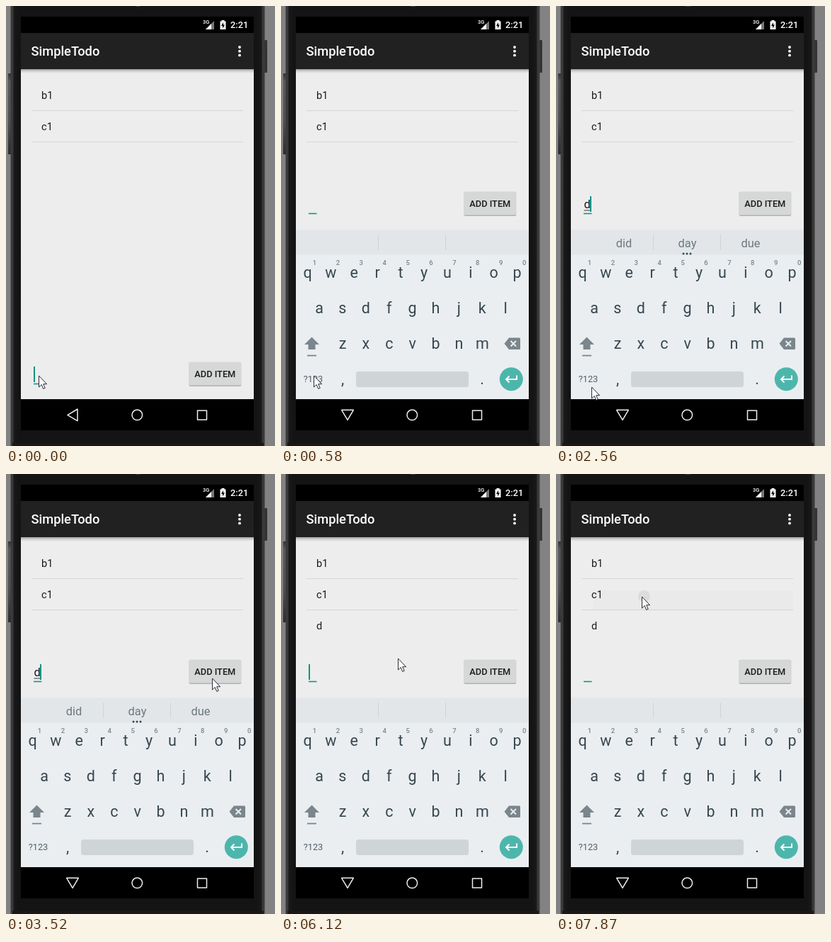
Recreate the animation shown at these times as an HTML page. Size 380 px wide and 620 px high, loop 8 s.

```html
<!DOCTYPE html>
<html lang="en">
<head>
<meta charset="utf-8">
<title>Todo list</title>
<style>
html, body { margin: 0; width: 100%; height: 100%; overflow: hidden; background: #828282; }
svg { display: block; width: 380px; height: 620px; font-family: Roboto, sans-serif; }
.medium { font-weight: 500; }
.middle { text-anchor: middle; }
</style>
</head>
<body>
<svg id="stage" viewBox="0 0 380 620">
  <defs>
    <linearGradient id="barShadow" x2="0" y2="1">
      <stop offset="0" stop-color="#000" stop-opacity=".32"/>
      <stop offset=".5" stop-color="#000" stop-opacity=".11"/>
      <stop offset="1" stop-color="#000" stop-opacity="0"/>
    </linearGradient>
    <linearGradient id="edge">
      <stop offset="0" stop-color="#3a3a3a"/>
      <stop offset=".008" stop-color="#3a3a3a"/>
      <stop offset=".014" stop-color="#191919"/>
      <stop offset=".03" stop-color="#141414"/>
      <stop offset=".97" stop-color="#141414"/>
      <stop offset=".986" stop-color="#191919"/>
      <stop offset=".992" stop-color="#3a3a3a"/>
      <stop offset="1" stop-color="#3a3a3a"/>
    </linearGradient>
    <linearGradient id="sideButton" x2="0" y2="1">
      <stop offset="0" stop-color="#333"/>
      <stop offset=".1" stop-color="#5a5a5a"/>
      <stop offset=".6" stop-color="#505050"/>
      <stop offset="1" stop-color="#2c2c2c"/>
    </linearGradient>
    <clipPath id="contentClip"><path d="M21 89h329v465H21z"/></clipPath>
  </defs>

  <!-- device -->
  <path d="M0 0h380v620H0z" fill="#828282"/>
  <rect x="3" y="95" width="6" height="114" rx="1" fill="url(#sideButton)"/>
  <rect x="364" y="48" width="5" height="46" rx="1" fill="#343434"/>
  <path d="M6.500 0h359v620h-359z" fill="url(#edge)"/>
  <path d="M182 0h9q-4.500 2-9 0z" fill="#444"/>
  <path d="M9 615.500h355v4.500H9z" fill="#1b1719"/>

  <!-- status and action bars -->
  <path d="M21 15h329v23H21z"/>
  <path d="M21 38h329v51H21z" fill="#212121"/>
  <g fill="#fff">
    <text x="278" y="25" font-size="7.500" class="medium">3G</text>
    <path d="M294 21v12h-12z" fill="#777"/>
    <path d="M290 25v8h-8z"/>
    <path d="M304.500 20h4v1.500h2v11.500h-8v-11.500h2z"/>
    <path d="M307 23l-3 5h2v3.500l3-5h-2z" fill="#000"/>
    <text x="317" y="31.300" font-size="12.800" class="medium">2:21</text>
    <text x="35.500" y="70" font-size="18.300" class="medium">SimpleTodo</text>
    <circle cx="330" cy="58" r="1.900"/><circle cx="330" cy="63.700" r="1.900"/><circle cx="330" cy="69.400" r="1.900"/>
  </g>

  <!-- list -->
  <path d="M21 89h329v465H21z" fill="#ededed"/>
  <path d="M21 89h329v6H21z" fill="url(#barShadow)"/>
  <path id="rowPress" d="M52 164h283v27H52z" fill="#eaeaea"/>
  <circle id="ripple" cx="124.500" cy="172.500" r="8.500" fill="#dcdcdc"/>
  <path d="M36 147.500h299M36 191.500h299" stroke="#d5d5d5"/>
  <g font-size="14.600" fill="#1a1a1a">
    <text x="50" y="131">b1</text>
    <text x="50" y="175">c1</text>
    <text id="newItem" x="50" y="219">d</text>
  </g>

  <!-- input row -->
  <g id="inputRow">
    <path d="M39 292.500h11.500" stroke="#0f9488" stroke-width="1.600"/>
    <g id="typed">
      <text x="39.500" y="285" font-size="16.400" fill="#1a1a1a">d</text>
      <path d="M39.500 288h9" stroke="#333"/>
    </g>
    <path id="caret" d="M0 268v22" stroke="#0f9488" stroke-width="2"/>
    <rect x="258" y="262" width="74.500" height="34" rx="2" fill="#000" opacity=".1"/>
    <rect x="259" y="263" width="73" height="33" rx="2" fill="#000" opacity=".17"/>
    <rect id="button" x="258.500" y="261.500" width="73.500" height="33" rx="2"/>
    <text x="295.300" y="283" font-size="12.800" class="medium middle" fill="#1a1a1a">ADD ITEM</text>
  </g>

  <g clip-path="url(#contentClip)">
    <g id="keyboard">
      <path d="M21 315.500h329V554H21z" fill="#eaeef1"/>
      <path d="M21 315.500h329v35H21z" fill="#e2e6e9"/>
      <path d="M137.500 322v22M232.500 322v22" stroke="#ced4d7"/>
      <g id="suggestions" font-size="16.400" class="middle" fill="#6d787d">
        <text x="96" y="340">did</text><text x="185.500" y="340">day</text><text x="275" y="340">due</text>
        <g fill="#37474f"><circle cx="180" cy="349" r="1.500"/><circle cx="185" cy="349" r="1.500"/><circle cx="190" cy="349" r="1.500"/></g>
      </g>
      <g id="keys" class="middle" fill="#37474f" font-size="21.500"></g>
      <g id="hints" class="middle medium" fill="#78858b" font-size="9.500"></g>
      <g fill="#7a868b">
        <path d="M43.500 466.500l10.500 10.500h-5.500v7h-10v-7h-5.500z"/>
        <path d="M37 491.700h13v1.800h-13z"/>
        <path d="M322 467.500h14.500q1.500 0 1.500 1.500v13.500q0 1.500-1.500 1.500H322l-6.500-8.200z"/>
        <path d="M324.500 472l7.500 7.500m0-7.500l-7.500 7.500" stroke="#eaeef1" stroke-width="1.900"/>
      </g>
      <text x="45.500" y="530" font-size="12.800" class="middle" fill="#546067">?123</text>
      <rect x="106" y="515" width="159" height="22" rx="3.500" fill="#cfd4d7"/>
      <circle cx="325.300" cy="525.700" r="16.500" fill="#4db6ac"/>
      <path d="M333 520.500v5.500h-15m4.500-4.500l-4.500 4.500 4.500 4.500" fill="none" stroke="#fff" stroke-width="1.900"/>
    </g>
  </g>

  <!-- navigation bar -->
  <path d="M21 554h329v44H21z"/>
  <g fill="none" stroke="#eee" stroke-width="1.500" stroke-linejoin="round">
    <path id="back" d="M87 576.300l14-8.300v16.600z"/>
    <circle cx="185.300" cy="576.300" r="7.300"/>
    <path d="M270.500 570h13v13h-13z"/>
  </g>

  <path id="pointer" d="M.5 0v16l3.700-3.500 2.500 5.900 2.500-1.100-2.500-5.600h4.900z" fill="#fff" stroke="#2c2c38" stroke-linejoin="round"/>
</svg>
<script>
const LOOP = 8000;
const KEYBOARD_AT = 320, TYPED_AT = 2190, PRESS_AT = 3800, ADDED_AT = 3990, ROW_PRESS_AT = 7860;
const $ = id => document.getElementById(id);

function addText(parent, content, x, y) {
  const node = document.createElementNS("http://www.w3.org/2000/svg", "text");
  node.setAttribute("x", x);
  node.setAttribute("y", y);
  node.textContent = content;
  parent.append(node);
}

const PITCH = 32.9;
const keyRows = [["qwertyuiop", 37.5, 383], ["asdfghjkl", 54, 433], ["zxcvbnm", 87, 483]];
for (const [letters, x, y] of keyRows)
  [...letters].forEach((letter, i) => addText($("keys"), letter, x + i * PITCH, y));
addText($("keys"), ",", 87, 533);
addText($("keys"), ".", 284, 533);
[..."1234567890"].forEach((digit, i) => addText($("hints"), digit, 47.5 + i * PITCH, 365));

// The screen refreshes in bursts: start, end, number of intervals.
const bursts = [[320, 1360, 8], [1520, 2560, 8], [2720, 3640, 7], [5320, 6120, 6], [6920, 7860, 6]];
function refreshTime(t) {
  const burst = bursts.findLast(([start]) => t >= start);
  if (!burst) return 0;
  const [start, end, count] = burst;
  const step = (end - start) / count;
  return Math.min(end, start + Math.floor((t - start) / step + 1e-6) * step);
}

// time, x, y
const path = [
  [0, 46, 521], [840, 46, 521], [1360, 68, 466], [1910, 119, 423], [2040, 119, 423],
  [2560, 50, 537], [2720, 56, 531], [3500, 291, 288], [5320, 291, 288],
  [5850, 190, 253], [6110, 165, 260], [6920, 165, 260], [7700, 121, 173], [LOOP, 121, 173]
];
function pointerAt(t) {
  const i = Math.max(1, path.findIndex(p => p[0] > t));
  const [t0, x0, y0] = path[i - 1], [t1, x1, y1] = path[i];
  const u = (t - t0) / (t1 - t0);
  const eased = u * u * (3 - 2 * u);
  return [x0 + (x1 - x0) * eased, y0 + (y1 - y0) * eased];
}

// The caret starts visible and flips at each of these times.
const blinks = [450, 970, 1450, 1910, 2720, 3230, 3640, ADDED_AT, 4600, 5030, 5590, 6110, 6520, 6920, 7410];
const caretVisible = t => blinks.filter(b => b <= t).length % 2 === 0;

const show = (id, on) => $(id).setAttribute("visibility", on ? "visible" : "hidden");
const move = (id, x, y) => $(id).setAttribute("transform", `translate(${x} ${y})`);

function render(t) {
  const keyboardOpen = t >= KEYBOARD_AT;
  const typed = t >= TYPED_AT && t < ADDED_AT;
  const pressed = t >= PRESS_AT && t < ADDED_AT;
  show("keyboard", keyboardOpen);
  move("keyboard", 0, t < KEYBOARD_AT + 130 ? 20 : 0);
  move("inputRow", 0, keyboardOpen ? 0 : 240);
  $("back").setAttribute("transform", keyboardOpen ? "rotate(-90 94 576.3)" : "");
  show("typed", typed);
  show("suggestions", typed);
  show("caret", caretVisible(t));
  move("caret", typed ? 49 : 40, 0);
  $("button").setAttribute("fill", pressed ? "#c9caca" : "#d6d7d7");
  show("newItem", t >= ADDED_AT);
  show("rowPress", t >= ROW_PRESS_AT);
  show("ripple", t >= ROW_PRESS_AT);
  move("pointer", ...pointerAt(refreshTime(t)));
}

const began = performance.now();
function tick() {
  render((performance.now() - began) % LOOP);
  requestAnimationFrame(tick);
}
tick();
</script>
</body>
</html>
```
